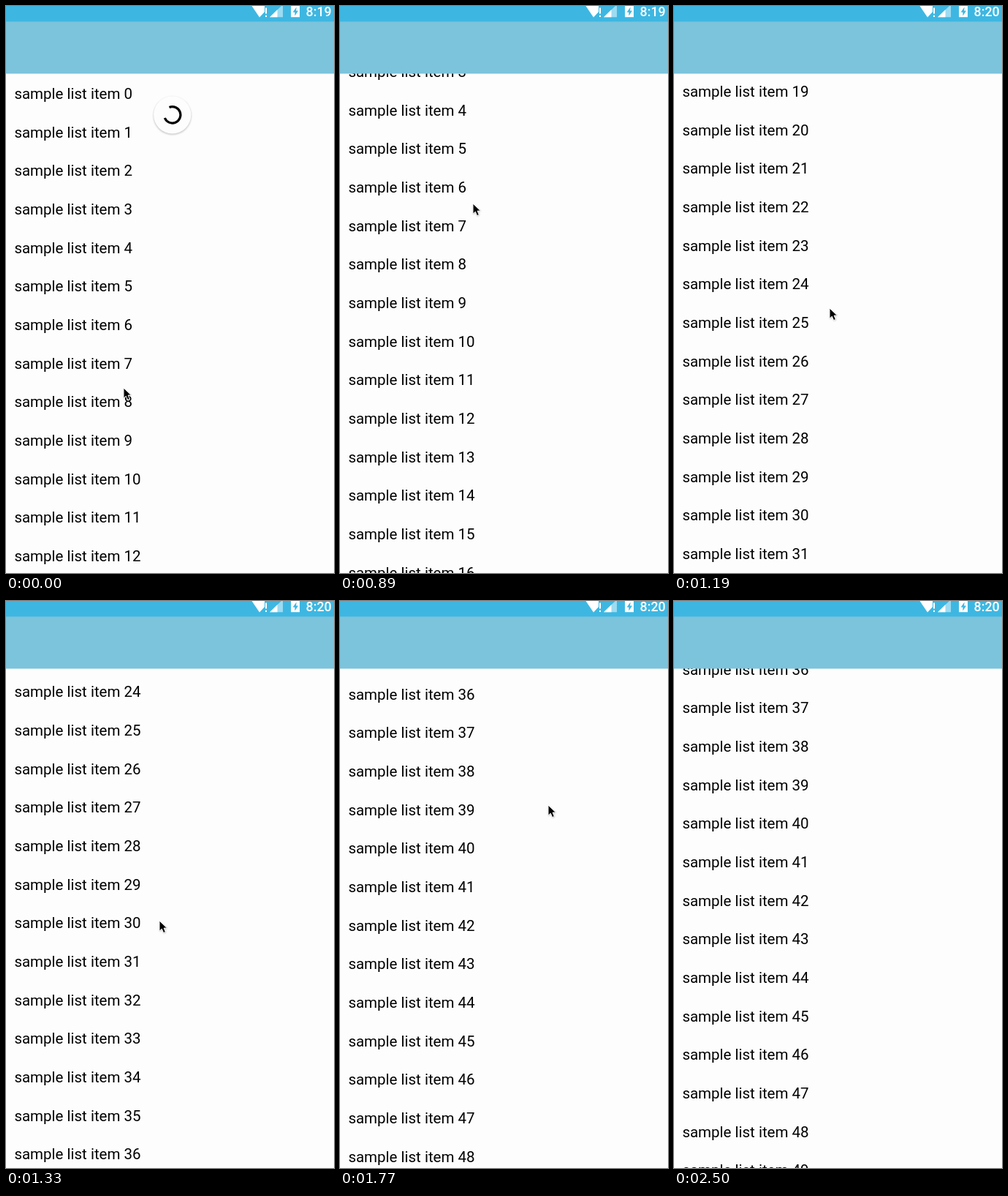
Recreate the animation shown at these times as an HTML page. Size 449x775 px, loop 3.17 s.

```html
<!DOCTYPE html>
<html lang="en">
<head>
<meta charset="utf-8">
<title>Sample list</title>
<style>
  html, body { margin: 0; width: 449px; height: 775px; overflow: hidden; background: #fdfdfd; }
  svg { display: block; }
  text { font-family: Roboto, Arial, sans-serif; }
  #list text { font-size: 20.5px; fill: #000; }
  #clock { font-size: 17.8px; font-weight: 500; fill: #fff; }
</style>
</head>
<body>
<svg width="449" height="775" viewBox="0 0 449 775">
  <defs>
    <filter id="soft" x="-30%" y="-30%" width="160%" height="160%"><feGaussianBlur stdDeviation="1.3"/></filter>
  </defs>
  <rect width="449" height="775" fill="#fdfdfd"/>
  <g id="list"></g>

  <rect y="21" width="449" height="71.5" fill="#7cc3dc"/>
  <rect width="449" height="21.3" fill="#3db7e2"/>
  <g id="status" fill="#fff">
    <path d="M336.5 0H354V8L347 15.5Z"/>
    <path d="M355 2.5h2v8h-2zM355 12.8h2v2.2h-2z"/>
    <path d="M361 15.2L379 -2V15.2Z" opacity=".5"/>
    <path d="M361 15.2L371.5 5V15.2Z"/>
    <path d="M390 0H402V15.2H390Z"/>
    <path d="M397.6 1.6L392.6 8.6H395.4V13.4L400 6.6H397.1Z" fill="#3db7e2"/>
  </g>
  <text id="clock" x="410.6" y="13.6"></text>

  <g id="spinner">
    <circle cy="1.2" r="26" fill="#000" opacity=".2" filter="url(#soft)"/>
    <circle r="25.6" fill="#fdfdfd"/>
    <path id="arc" fill="none" stroke="#000" stroke-width="3.2"/>
  </g>

  <g id="pointer">
    <path d="M1.5 2V16L5 13L7.5 18.5L10.5 17L8.3 12H12.5Z" fill="#000" opacity=".3" filter="url(#soft)"/>
    <path d="M1.5 1V15.2L4.8 12.2L7.1 17.6L9.9 16.4L7.6 11.1H12Z" fill="#000" stroke="#fff" stroke-width="1"/>
  </g>
</svg>
<script>
const LOOP = 3170, PITCH = 52.667, COUNT = 50;
const $ = id => document.getElementById(id);

// [time, value] steps, each held until the next
const scroll = [[0, 0], [890, 188], [1040, 620.2], [1190, 1003.7], [1330, 1259.7],
  [1480, 1425.2], [1620, 1519.3], [1770, 1888.4], [1910, 1922.5]];
const pointer = [[0, [159.5, 521]], [450, [166.5, 517.5]], [600, [184, 567]], [740, [182, 535]],
  [890, [180.5, 269]], [1040, [196, 340]], [1190, [211.5, 412]], [1330, [208.5, 436]],
  [1480, [208.5, 457]], [1620, [250, 368]], [1770, [283.5, 278]], [1910, [346, 612]],
  [2060, [353, 642]], [2210, [341, 616]], [2350, [355, 650]], [2500, null]];
const spinner = [[0, [1, 0]], [150, [0.62, 40]], [300, null]];
const clock = [[0, '8:19'], [1040, '8:20']];

const at = (steps, t) => steps.filter(s => s[0] <= t).pop()[1];

function place(el, transform) {
  el.style.display = transform ? '' : 'none';
  if (transform) el.setAttribute('transform', transform);
}

function arcPath(r, from, to) {
  const point = deg => {
    const a = deg * Math.PI / 180;
    return `${r * Math.cos(a)} ${r * Math.sin(a)}`;
  };
  return `M${point(from)}A${r} ${r} 0 ${to - from > 180 ? 1 : 0} 1 ${point(to)}`;
}

for (let i = 0; i < COUNT; i++) {
  const row = document.createElementNS('http://www.w3.org/2000/svg', 'text');
  row.setAttribute('x', 11.4);
  row.setAttribute('y', 127 + i * PITCH);
  row.textContent = `sample list item ${i}`;
  $('list').append(row);
}
$('arc').setAttribute('d', arcPath(11.2, -112, 158));

const start = performance.now();
function draw(now) {
  const t = Math.max(0, now - start) % LOOP;
  place($('list'), `translate(0 ${-at(scroll, t)})`);
  const p = at(pointer, t);
  place($('pointer'), p && `translate(${p})`);
  const s = at(spinner, t);
  place($('spinner'), s && `translate(227.7 148.8) scale(${s[0]})`);
  if (s) $('arc').setAttribute('transform', `rotate(${s[1]})`);
  $('clock').textContent = at(clock, t);
  requestAnimationFrame(draw);
}
draw(start);
</script>
</body>
</html>
```
